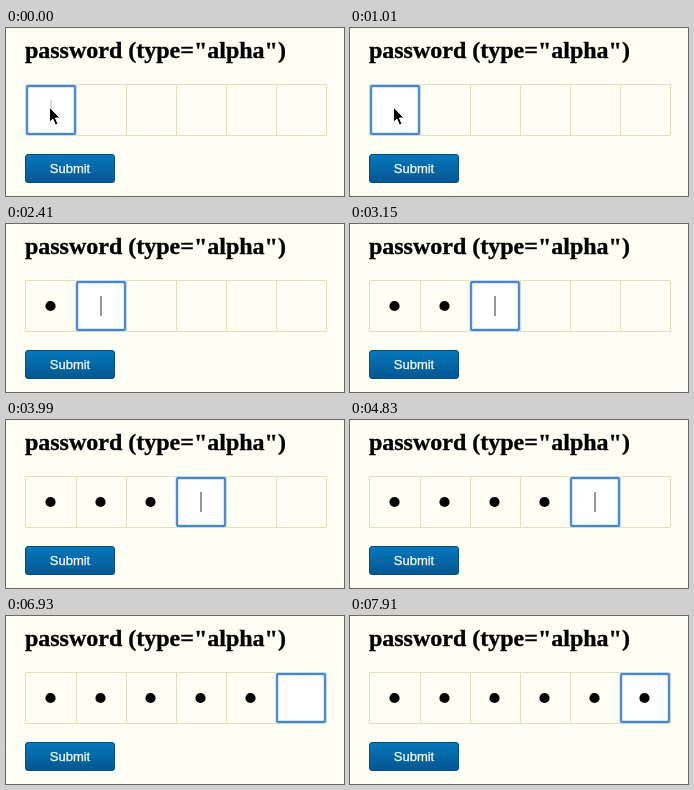
Write an HTML page that moves like this. It is 338 px wide and 168 px high and loops after 8000 ms.

```html
<!DOCTYPE html>
<html lang="en">
<head>
<meta charset="utf-8">
<title>Password field</title>
<style>
  html, body { margin: 0; width: 100%; height: 100%; overflow: hidden; background: #fffff6; }
  svg { display: block; width: 338px; height: 168px; }
  .title { font: bold 24px "Liberation Serif", Times, serif; stroke: #000; stroke-width: .35; }
  .label { font: 13px "Liberation Sans", Arial, sans-serif; fill: #fff; stroke: #fff; stroke-width: .25; text-anchor: middle; }
  .grid { fill: none; stroke: #dfe2b6; }
  .halo { fill: #fff; stroke: #b4d0f0; stroke-width: 3; }
  .ring { fill: none; stroke: #1e70cc; stroke-width: 1.4; }
</style>
</head>
<body>
<svg viewBox="0 0 338 168">
  <defs>
    <linearGradient id="blue" x2="0" y2="1">
      <stop stop-color="#0678be"/>
      <stop offset="1" stop-color="#045690"/>
    </linearGradient>
  </defs>
  <text class="title" x="18.9" y="30">password (type="alpha")</text>
  <path class="grid" d="M19.5 56.5h301v51h-301zM70.5 56.5v51m50-51v51m50-51v51m50-51v51m50-51v51"/>
  <g id="focus">
    <rect class="halo" x="21" y="58" width="48" height="48" rx="1"/>
    <rect class="ring" x="21" y="58" width="48" height="48" rx="1"/>
  </g>
  <g id="dots"></g>
  <rect id="caret" y="72" width="1" height="20" fill="#332"/>
  <path id="pointer" d="M43.5 79.2v15l3.4-3.2 2.5 5.9 2.5-1.1-2.5-5.8h4.6z" fill="#000" stroke="#fff" stroke-width=".9"/>
  <rect x="19.5" y="126.5" width="89" height="28" rx="2.5" fill="url(#blue)" stroke="#054e7e"/>
  <text class="label" x="64" y="145">Submit</text>
</svg>
<script>
  const LOOP = 8000, BLINK = 840, PITCH = 50;
  const keyTimes = [1590, 2470, 3430, 4300, 5850, 7440];
  const byId = id => document.getElementById(id);
  const clamp = v => Math.min(1, Math.max(0, v));

  const dots = keyTimes.map((_, i) => {
    const dot = document.createElementNS("http://www.w3.org/2000/svg", "circle");
    dot.setAttribute("cx", 44.5 + PITCH * i);
    dot.setAttribute("cy", 82);
    dot.setAttribute("r", 5.1);
    return byId("dots").appendChild(dot);
  });

  // Fully on, fade out, off, fade in.
  function caretOpacity(t) {
    const phase = (t + BLINK) % BLINK;
    return phase < 420 ? clamp((275 - phase) / 175) : clamp((phase - 540) / 160);
  }

  function draw(now) {
    const t = now % LOOP;
    const typed = keyTimes.filter(k => t >= k).length;
    const full = typed === keyTimes.length;
    const cell = Math.min(typed, keyTimes.length - 1);

    dots.forEach((dot, i) => dot.style.display = i < typed ? "" : "none");
    byId("focus").setAttribute("transform", `translate(${PITCH * cell})`);
    byId("caret").setAttribute("x", (full ? 50 : 44.5) + PITCH * cell);
    // The last key restarts the blink.
    byId("caret").style.opacity = caretOpacity(full ? t - 7580 : t - 630);
    byId("pointer").style.display = typed ? "none" : "";
    requestAnimationFrame(draw);
  }
  draw(performance.now());
</script>
</body>
</html>
```
